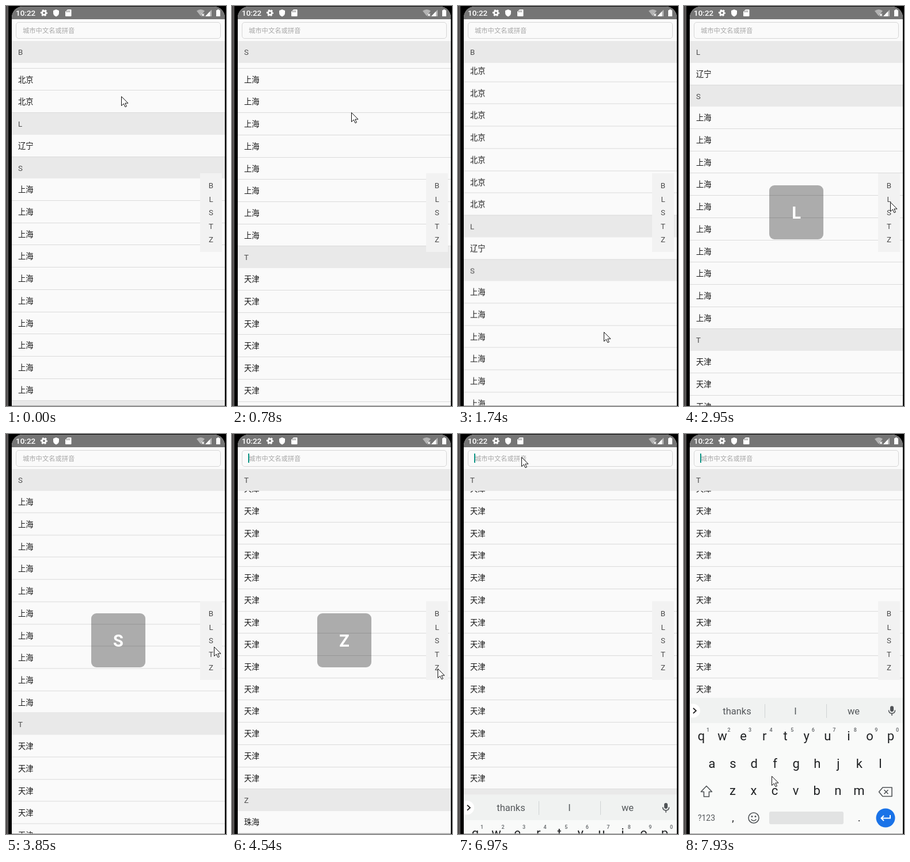
Write an HTML page that moves like this. It is 382 px wide and 696 px high and loops after 8 s.

```html
<!DOCTYPE html>
<html lang="zh-CN">
<head>
<meta charset="utf-8">
<title>城市列表</title>
<style>
html, body { margin: 0; width: 100%; height: 100%; overflow: hidden; background: #000; }
#stage { position: relative; width: 382px; height: 696px; overflow: hidden; background: #000;
  font-family: Roboto, "Noto Sans CJK SC", "Noto Sans CJK", sans-serif; }
#stage > *, #screen > * { position: absolute; }
#bezel { left: 0; top: 0; width: 10px; height: 696px;
  background: linear-gradient(90deg, #565353 1px, #3a3838 1px 2px, #777272 2px 3px, #444 3px 4px, #1c1c1c 4px 5px, #000 5px); }
#screen { left: 10px; top: 1px; width: 370px; height: 695px; overflow: hidden;
  border-radius: 19px 19px 0 0; background: #fafafa; }
#screen > .view { left: -10px; top: -1px; width: 382px; height: 696px; }
.view > * { position: absolute; }

#clip { left: 10px; top: 61px; width: 370px; height: 635px; overflow: hidden; }
#list { position: absolute; left: 0; top: -486px; width: 370px; animation: scroll 8s linear infinite; }
.head, .row { box-sizing: border-box; padding-left: 11px; font-size: 13.3px; }
.head { height: 37.8px; line-height: 39px; background: #e9e9e9; color: #4c4c4c; }
.row { height: 38.72px; line-height: 37px; color: #141414; border-bottom: 1px solid #dadada;
  font-family: "Noto Sans CJK SC", "Noto Sans CJK", sans-serif; }
#pin { left: 10px; top: 61px; width: 370px; height: 38px; overflow: hidden; background: #e9e9e9; }
#pin .strip { animation: pin 8s step-end infinite; }
#pin .head { height: 38px; }

#search { left: 10px; top: 23px; width: 370px; height: 38px; background: #fafafa; }
#field { position: absolute; left: 7px; top: 5px; width: 356px; height: 29px; padding-left: 11px;
  box-sizing: border-box; border: 1px solid #d6d6d6; border-radius: 5px; color: #a6a6a6;
  font: 300 11.3px/26px "Noto Sans CJK SC", "Noto Sans CJK", sans-serif; }
#caret { position: absolute; left: 18px; top: 11px; width: 2px; height: 16px; background: #0d9484;
  animation: caret 8s step-end infinite; }

#index { left: 337px; top: 291px; width: 38px; height: 137px; box-sizing: border-box; padding-top: 10px;
  background: #f2f2f2; color: #4a4a4a; text-align: center; font-size: 13.3px; line-height: 23.6px; }
#badge { left: 148px; top: 312px; width: 94px; height: 94px; overflow: hidden; border-radius: 9px;
  background: rgba(0,0,0,.31); color: #fff; text-align: center; font: bold 29px/96px Roboto, sans-serif;
  animation: badge 8s step-end infinite; }
#badge .strip { animation: letter 8s step-end infinite; }
#badge .strip div { height: 96px; }
#board { left: 0; top: 0; animation: board 8s cubic-bezier(.1,.6,.3,1) infinite; }
#board text { text-anchor: middle; fill: #1f2123; font-size: 22px; }
#board .word { font-size: 16.5px; fill: #54585b; }
#board .hint { font-size: 9px; font-weight: 500; fill: #5f6366; }
#pointer { left: 0; top: 0; animation: pointer 8s linear infinite; }

@keyframes scroll {
  0%, 4.375% { transform: translateY(186px); }
  9.75%, 15% { transform: translateY(-83px); }
  21.75%, 32.49% { transform: translateY(364.5px); }
  32.5%, 35.37% { transform: translateY(486px); }
  35.375%, 46.24% { transform: translateY(61px); }
  46.25%, 50.62% { transform: translateY(-15.5px); }
  50.625%, 54.99% { transform: translateY(-440.5px); }
  55%, 100% { transform: translateY(-462.9px); }
}
@keyframes pin {
  0%, 17.175% { transform: translateY(0); }
  6.875%, 16.01%, 35.375% { transform: translateY(-38px); }
  8.4%, 46.25% { transform: translateY(-76px); }
  50.625%, 100% { transform: translateY(-114px); }
}
@keyframes badge {
  0%, 58.625%, 100% { visibility: hidden; }
  32.5% { visibility: visible; }
}
@keyframes letter {
  0% { transform: translateY(0); }
  35.375% { transform: translateY(-96px); }
  46.25% { transform: translateY(-192px); }
  50.625% { transform: translateY(-288px); }
  55%, 100% { transform: translateY(-384px); }
}
@keyframes caret {
  0%, 8.375%, 20.625%, 32.875%, 45.125%, 57.375%, 69.625%, 81.875%, 92.5% { opacity: 0; }
  2.25%, 14.5%, 26.75%, 39%, 51.25%, 63.5%, 75.75%, 86.25%, 98.75%, 100% { opacity: 1; }
}
@keyframes board {
  0%, 86.9% { transform: translateY(240px); }
  90.6%, 100% { transform: translateY(0); }
}
@keyframes pointer {
  0%, 1.875% { transform: translate(200px, 157px); }
  4.375% { transform: translate(205px, 454px); }
  9.75%, 11.25% { transform: translate(207px, 185px); }
  13.125%, 15% { transform: translate(215px, 120px); }
  21.75%, 23.6% { transform: translate(253px, 567px); }
  26.6% { transform: translate(330px, 412px); }
  28.1%, 31.6% { transform: translate(354px, 385px); }
  32.4% { transform: translate(357px, 313px); }
  36.875%, 38.4% { transform: translate(358px, 341px); }
  41.75%, 45.1% { transform: translate(358px, 347px); }
  48.1%, 50% { transform: translate(361px, 370px); }
  52.5% { transform: translate(359px, 386px); }
  56.75%, 58.6% { transform: translate(357px, 408px); }
  63% { transform: translate(270px, 660px); }
  69.875%, 71.75% { transform: translate(163px, 619px); }
  75.6% { transform: translate(158px, 658px); }
  83.75%, 88% { transform: translate(110px, 40px); }
  95% { transform: translate(150px, 570px); }
  99.1%, 100% { transform: translate(152px, 595px); }
}
</style>
</head>
<body>
<div id="stage">
  <div id="bezel"></div>
  <div id="screen"><div class="view">
    <div id="clip"><div id="list"></div></div>
    <div id="pin"><div class="strip"></div></div>
    <div id="search"><div id="field">城市中文名或拼音</div><div id="caret"></div></div>
    <div id="index"></div>
    <div id="badge"><div class="strip"></div></div>

    <svg width="382" height="24" style="left:0;top:0">
      <rect width="382" height="23" fill="#757575"/>
      <text x="17" y="17" fill="#fff" font-size="13.5" font-weight="500">10:22</text>
      <g fill="#fff">
        <circle cx="66" cy="12" r="3.3" fill="none" stroke="#fff" stroke-width="2.8"/>
        <circle cx="66" cy="12" r="5.2" fill="none" stroke="#fff" stroke-width="1.8" stroke-dasharray="2.9 2.545" stroke-dashoffset="1.4"/>
        <path d="M87 6l5 2v4q0 4.5-5 6.5q-5-2-5-6.5V8z"/>
        <path d="M107 6h5.5q1 0 1 1v10q0 1-1 1h-8.5q-1 0-1-1V10z"/>
        <path d="M331 8.5q7-5 14 0l-7 9z" opacity=".45"/>
        <path d="M357 6.5V18H346z" opacity=".5"/><path d="M354 9.6V18h-8z"/>
        <path d="M367 6h3v1.3h2V18h-7V7.3h2z"/>
      </g>
      <path d="M105.5 8.5v2.5M107.8 7.5v3.5M110.1 7.5v3.5" stroke="#757575"/>
      <path d="M340 13.5l4 4m0-4l-4 4" stroke="#fff" stroke-width="1.3"/>
    </svg>

    <svg id="board" width="382" height="696">
      <rect x="10" y="459" width="370" height="237" fill="#f9faf9"/>
      <rect x="10" y="459" width="370" height="44" fill="#f0f2f1"/>
      <path d="M10 469.5h6a12 12 0 0 1 0 24h-6z" fill="#fff"/>
      <path d="M16 477l5 4.5-5 4.5" fill="none" stroke="#222" stroke-width="1.8"/>
      <path d="M140.5 470v24M247.5 470v24" stroke="#cfd2d3"/>
      <g fill="none" stroke="#505457" stroke-width="1.6">
        <rect x="358.8" y="474" width="4.4" height="8.5" rx="2.2" fill="#505457"/>
        <path d="M355.5 480.5q0 5.5 5.5 5.5t5.5-5.5M361 486v4"/>
        <path d="M39 612.5l9.5 10h-5v8.5h-9v-8.5h-5z" stroke-linejoin="round"/>
        <path d="M345 615h16v15.5h-16l-6.5-7.7zM347.5 619.3l7 7m0-7l-7 7" stroke-linejoin="round"/>
        <circle cx="121" cy="668" r="9"/>
        <path d="M116.5 670.5q4.5 5 9 0"/>
      </g>
      <circle cx="118" cy="665.5" r="1.5" fill="#505457"/><circle cx="124" cy="665.5" r="1.5" fill="#505457"/>
      <rect x="148" y="657" width="129" height="22" rx="3" fill="#e2e3e3"/>
      <circle cx="350" cy="668" r="16.5" fill="#1a73e8"/>
      <path d="M358 663v5.5h-15M347 664l-4.5 4.5 4.5 4.5" fill="none" stroke="#fff" stroke-width="2"/>
    </svg>
    <div style="left:10px;top:695px;width:370px;height:1px;background:#a5a5a5"></div>
  </div></div>

  <svg id="pointer" width="14" height="20">
    <path d="M.5.5v16l3.8-3.5 2.7 5.7 2.4-1.1-2.6-5.5h5.2z" fill="#fff" stroke="#111"/>
  </svg>
</div>
<script>
const $ = sel => document.querySelector(sel);
const groups = [["B", "北京", 10], ["L", "辽宁", 1], ["S", "上海", 10], ["T", "天津", 14], ["Z", "珠海", 1]];
const div = (text, cls = "") => `<div class="${cls}">${text}</div>`;
const each = fn => groups.map(fn).join("");

$("#list").innerHTML = each(([key, city, n]) => div(key, "head") + div(city, "row").repeat(n));
$("#pin .strip").innerHTML = each(([key]) => div(key, "head"));
$("#index").innerHTML = $("#badge .strip").innerHTML = each(([key]) => div(key));

const board = $("#board");
function label(text, x, y, cls = "", size) {
  const el = document.createElementNS("http://www.w3.org/2000/svg", "text");
  el.textContent = text;
  el.setAttribute("x", x);
  el.setAttribute("y", y);
  el.setAttribute("class", cls);
  if (size) el.style.fontSize = size + "px";
  board.append(el);
}
const keys = [["qwertyuiop", 30, 533], ["asdfghjkl", 48.5, 580.5], ["zxcvbnm", 84.5, 628]];
keys.forEach(([row, x, y], r) => [...row].forEach((ch, i) => {
  const cx = x + 36.55 * i;
  label(ch, cx, y);
  if (!r) label((i + 1) % 10, cx + 11.5, 518, "hint");
}));
[["thanks", 92], ["I", 193.5], ["we", 294.5]].forEach(([word, x]) => label(word, x, 487.5, "word"));
label("?123", 39, 673, "word", 14);
label(",", 85, 674, "", 18);
label(".", 304, 674, "", 18);
</script>
</body>
</html>
```
